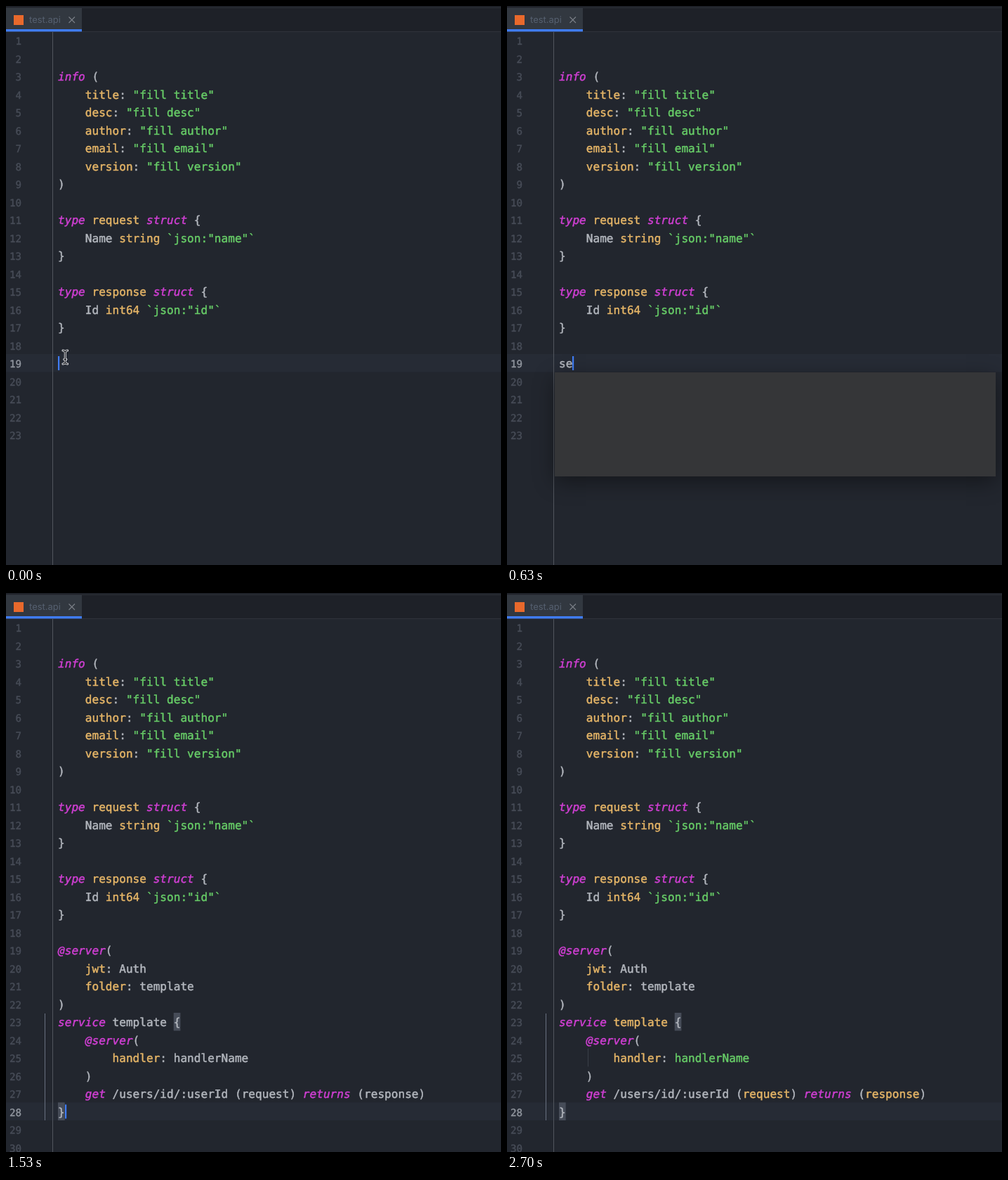
An HTML page with a canvas that plays this animation: 705x795 px, repeating every 2760 ms.

```html
<!DOCTYPE html>
<html lang="en">
<head>
<meta charset="utf-8">
<title>Editor completion</title>
<style>
  html, body { margin: 0; width: 100%; height: 100%; overflow: hidden; background: #22262e; }
  canvas { display: block; }
</style>
</head>
<body>
<canvas id="stage" width="705" height="795"></canvas>
<script>
const ctx = document.getElementById('stage').getContext('2d');

const LOOP = 2760;
const TIME = { s: 330, popup: 430, e: 600, filled: 770, r: 1000, template: 1470, resolved: 1830, caretOff: 2370 };

const LEFT = 74, CHAR = 9.69, TOP = 36, ROW = 25.5;
const MONO = '"DejaVu Sans Mono", monospace';
const CODE = '16.1px ' + MONO;
const UI = '13px Inter, sans-serif';
const COLOR = {
  back: '#22262e', row: '#262b35', plain: '#b3b7be', keyword: '#d03fd3',
  name: '#e5b567', string: '#67cc67', blue: '#3f7cf4', dim: '#474c57'
};

// Markers toggle a style: ~ keyword, ^ name, $ string; * and % are name and string once resolved.
const STYLE = { '~': 'keyword', '^': 'name', '$': 'string', '*': 'name', '%': 'string' };

const HEAD = [
  '', '',
  '~info~ (',
  '    ^title^: $"fill title"$',
  '    ^desc^: $"fill desc"$',
  '    ^author^: $"fill author"$',
  '    ^email^: $"fill email"$',
  '    ^version^: $"fill version"$',
  ')', '',
  '~type~ ^request^ ~struct~ {',
  '    Name ^string^ $`json:"name"`$',
  '}', '',
  '~type~ ^response^ ~struct~ {',
  '    Id ^int64^ $`json:"id"`$',
  '}', ''
];
const TEMPLATE = [
  '~@server~(',
  '    ^jwt^: Auth',
  '    ^folder^: template',
  ')',
  '~service~ *template* {',
  '    ~@server~(',
  '        ^handler^: %handlerName%',
  '    )',
  '    ~get~ /users/id/:userId (*request*) ~returns~ (*response*)',
  '}'
];

const rowTop = line => TOP + (line - 1) * ROW;
const column = n => LEFT + n * CHAR;

function rect(x, y, w, h, color) {
  ctx.fillStyle = color;
  ctx.fillRect(x, y, w, h);
}

function text(str, x, y, color, font = UI, align = 'left') {
  ctx.font = font;
  ctx.textAlign = align;
  ctx.fillStyle = color;
  ctx.fillText(str, x, y);
}

// A thin outline gives the monospace face a medium weight.
function mono(str, x, y, color, font = CODE, align = 'left') {
  text(str, x, y, color, font, align);
  ctx.strokeStyle = color;
  ctx.lineWidth = 0.45;
  ctx.strokeText(str, x, y);
}

function path(points, color, width) {
  ctx.beginPath();
  points.forEach(([x, y], i) => i ? ctx.lineTo(x, y) : ctx.moveTo(x, y));
  ctx.strokeStyle = color;
  ctx.lineWidth = width;
  ctx.stroke();
}

function codeLine(source, line, resolved) {
  let col = 0, mark = '';
  for (const part of source.split(/([~^$*%])/)) {
    if (STYLE[part]) {
      mark = mark ? '' : part;
      continue;
    }
    const pending = !resolved && (mark === '*' || mark === '%');
    const color = COLOR[pending || !mark ? 'plain' : STYLE[mark]];
    mono(part, column(col), rowTop(line) + 19, color, mark === '~' ? 'italic ' + CODE : CODE);
    col += part.length;
  }
}

function tabBar() {
  rect(0, 0, 705, 36, '#1e2128');
  rect(0, 2, 705, 1, '#2b2f37');
  rect(0, 36, 705, 1, '#2f333b');
  rect(0, 3, 108, 30, '#323840');
  rect(0, 33, 108, 3.4, COLOR.blue);
  rect(11, 13, 14, 14, '#e8692c');
  text('test.api', 33, 24.3, '#566070');
  path([[89.5, 15.5], [98, 24]], '#7c8189', 1.1);
  path([[98, 15.5], [89.5, 24]], '#7c8189', 1.1);
}

function gutter(count, current) {
  rect(66, 37, 1, 758, '#51555d');
  for (let n = 1; n <= count; n++) {
    mono(n, 22, rowTop(n) + 19, n === current ? '#8f949d' : COLOR.dim, '14.2px ' + MONO, 'right');
  }
}

function caret(line, col) {
  rect(Math.round(column(col)), rowTop(line) + 3, 2.2, 20, COLOR.blue);
}

function mouse() {
  for (const [color, width] of [['#e8e9ec', 3], ['#14161b', 1.2]]) {
    ctx.lineCap = 'round';
    path([[81, 490], [83, 490.4], [84.3, 492], [84.3, 507], [83, 508.6], [81, 509]], color, width);
    path([[87.6, 490], [85.6, 490.4], [84.3, 492]], color, width);
    path([[87.6, 509], [85.6, 508.6], [84.3, 507]], color, width);
    path([[82.8, 502.5], [85.8, 502.5]], color, width);
  }
  ctx.lineCap = 'butt';
}

function arrowKey(x, down) {
  const tip = down ? 563 : 554, wing = down ? 559 : 558;
  path([[x + 1, 558], [x + 4.5, 554.5], [x + 8, 558]], '#59606a', 1.1);
  path([[x + 16, 554], [x + 16, 563]], '#59606a', 1.2);
  path([[x + 12, wing], [x + 16, tip], [x + 20, wing]], '#59606a', 1.2);
}

function popup(typed, filled) {
  ctx.save();
  ctx.shadowColor = 'rgba(0, 0, 0, 0.4)';
  ctx.shadowBlur = 28;
  ctx.shadowOffsetY = 8;
  rect(68, 521, 628, filled ? 50.5 : 148, filled ? '#262d34' : '#353638');
  ctx.restore();
  if (!filled) return;

  mono(typed, LEFT, 538, '#4a86f5');
  mono('service'.slice(typed.length), column(typed.length), 538, COLOR.plain);
  mono('service declaration', 683, 538, '#777c84', CODE, 'right');

  rect(68, 545, 628, 26.5, '#30373e');
  arrowKey(74, true);
  text('and', 101, 563.3, '#59606a');
  arrowKey(127, false);
  text('will move caret down and up in the editor', 154, 563.3, '#59606a');
  text('Next Tip', 417, 563.3, '#4a84ee', '500 ' + UI);
  for (const y of [552.5, 558.5, 564.5]) {
    ctx.beginPath();
    ctx.arc(682, y, 1.9, 0, Math.PI * 2);
    ctx.fillStyle = '#b9bdc3';
    ctx.fill();
  }
}

function draw(t) {
  const expanded = t >= TIME.template;
  const resolved = t >= TIME.resolved;
  const current = expanded ? 28 : 19;
  const typed = 'ser'.slice(0, [TIME.s, TIME.e, TIME.r].filter(at => t >= at).length);

  ctx.textRendering = 'geometricPrecision';
  ctx.lineJoin = 'round';
  rect(0, 0, 705, 795, COLOR.back);
  rect(0, rowTop(current), 705, ROW, COLOR.row);
  tabBar();
  gutter(expanded ? 30 : 23, current);

  if (expanded) {
    rect(55, 598, 1, 152, '#687080');
    rect(column(17), rowTop(23), CHAR, ROW, '#464c58');
    rect(column(0), rowTop(28), CHAR, ROW, '#464c58');
    if (resolved) rect(115, rowTop(25), 1, ROW, '#3a3f48');
  }

  const lines = HEAD.concat(expanded ? TEMPLATE : typed);
  lines.forEach((source, i) => codeLine(source, i + 1, resolved));

  if (t < TIME.caretOff) caret(current, expanded ? 1 : typed.length);
  if (!typed) mouse();
  if (t >= TIME.popup && !expanded) popup(typed, t >= TIME.filled);
}

const start = performance.now();
function tick() {
  draw((performance.now() - start) % LOOP);
  requestAnimationFrame(tick);
}
tick();
</script>
</body>
</html>
```
